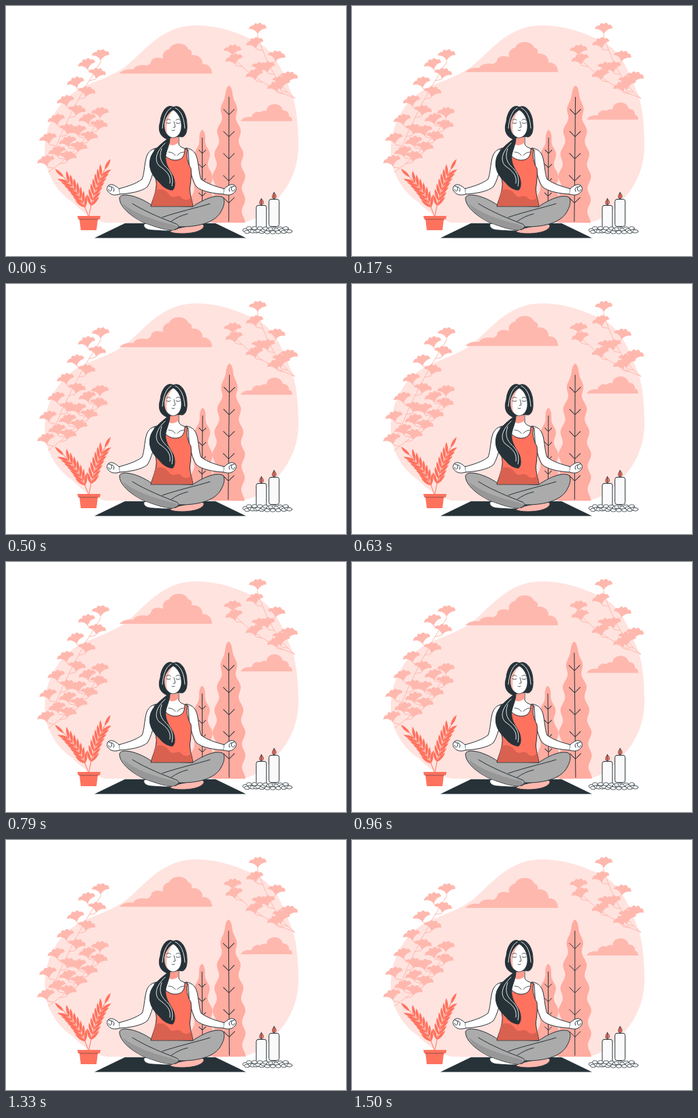
These frames come from a looping animation (500 by 368 pixels, 1.54 s). An HTML page:

```html
<!DOCTYPE html>
<html lang="en">
<head>
<meta charset="utf-8">
<title>Meditation</title>
<style>
  html, body { margin: 0; width: 100%; height: 100%; overflow: hidden; background: #fff; }
  svg { display: block; width: 500px; height: 368px; }
  .ink { fill: none; stroke: #263238; stroke-linecap: round; stroke-linejoin: round; }
  .flat { stroke: none; }
  .skin { fill: #fff; }
  .wax { fill: #fafafa; }
  .soft { fill: #ffb8ae; }
  .tree { fill: #ffaca1; }
  .coral { fill: #ff725e; }
  .dark { fill: #263238; }
  .twig { fill: none; stroke: #ffb8ae; }
  .stem { fill: none; stroke: #ff725e; }
  .shine { stroke: #fff; }
</style>
</head>
<body>
<svg viewBox="0 0 500 368">
  <path fill="#ffe3df" d="M147 319C128 315 111 303 97 288C78 276 57 249 57 213C57 180 72 148 97 129C120 112 148 109 176 89C200 70 222 38 262 30C300 23 350 40 379 59C402 77 411 108 421 131C428 152 430 180 430 208C429 250 408 275 395 289C380 304 365 319 340 319Z"/>

  <g id="clouds" class="soft">
    <path d="M167 100C171 95 177 93 187 94C191 87 200 87 208 88C212 86 214 83 214 80C219 75 226 76 231 78C229 69 235 65 240 64C244 53 264 53 268 64C273 65 274 69 273 73C281 71 290 77 289 86C296 85 303 90 303 100Z"/>
    <path d="M345 170C348 165 353 163 361 164C363 157 369 155 374 157C377 154 381 154 383 155C384 142 404 141 407 154C413 154 417 158 416 163C419 163 421 166 421 170Z"/>
  </g>

  <g id="ginkgo" class="soft"></g>
  <g id="potted" class="coral"></g>
  <path class="coral" d="M105 309H139L138 314H135L133 330H110L108 314H106Z"/>
  <path class="ink" stroke-width=".5" d="M108 314H135"/>
  <g id="trees"></g>
  <path class="dark" d="M175 319.7H308L353 341.5H130Z"/>

  <g class="ink" stroke-width="1">
    <!-- feet -->
    <path class="skin" d="M203 321C201 326 207 330 216 330C230 331 242 332 252 329L258 322L222 315Z"/>
    <path class="soft" d="M240 332C252 326 265 325 276 322C284 319 292 320 291 325C287 333 270 335 258 335C250 335 244 334 240 332Z"/>
    <!-- legs -->
    <path fill="#ababab" d="M214 293C194 279 170 274 167 282C166 294 182 309 203 319C220 325 238 332 250 329C257 326 251 324 257 325C285 325 309 318 317 301C321 294 323 284 318 281C307 277 288 286 275 295Z"/>
    <path class="flat" fill="#979797" d="M172 291C177 303 190 314 206 320C225 326 240 332 250 329C256 326 250 323 242 321C218 315 190 306 172 291Z"/>
    <path d="M186 291C207 304 233 314 251 321C256 324 253 328 248 329M230 311C253 303 281 297 300 291M243 317C250 312 258 308 267 306"/>
    <!-- arms -->
    <path class="skin" d="M222 209C211 211 207 217 205 229C203 240 203 248 200 255C191 262 177 266 166 269L167 277C183 276 200 273 208 266C213 258 215 249 218 239Z"/>
    <path class="skin" d="M265 209C276 211 280 217 282 229C284 240 284 248 287 255C296 262 310 266 321 269L320 277C304 276 288 273 280 266C275 259 273 249 270 239Z"/>
    <g id="hand">
      <path class="skin" d="M166 269C161 264 155 261 151 264C148 266 148 271 150 273C153 277 158 280 167 277"/>
      <path d="M151 265C154 265 157 268 155 271C153 274 151 272 151 270M155 266C159 267 160 270 158 273"/>
    </g>
    <use href="#hand" transform="matrix(-1 0 0 1 487 0)"/>
    <!-- torso -->
    <path class="skin" d="M238 188V204C233 208 225 209 218 211L221 246H270L268 212C262 209 255 208 254 203V188Z"/>
    <path class="flat" fill="#ff9c8f" d="M238.500 190H253.500V201C248 206 241 206 238.500 202Z"/>
    <path class="coral" d="M222 210C223 224 221 232 217 238C218 249 222 258 221 265C220 277 215 286 213 295H275C273 283 269 274 271 264C272 255 273 247 272 239C267 231 265 221 267 211L263 210C263 223 257 227 248 227C238 226 230 219 229 209Z"/>
    <path class="flat" fill="#d9614f" d="M220 271C218 280 215 287 214 294.500H274.500L272 282C266 288 260 285 257 281C251 277 247 284 241 279C235 270 228 268 220 271Z"/>
    <path stroke-width=".8" d="M239 215C244 215 247 217 249 220M252 220C254 217 258 215 262 215"/>
    <!-- hair and face -->
    <path class="dark" d="M246 149C236 143 228 157 227 170C223 182 226 192 237 196C228 203 214 214 212 226C209 240 216 251 226 260C231 267 239 271 245 271C249 267 249 259 246 251C240 240 233 232 235 219C237 210 241 203 241 194L255 192C264 196 267 184 266 174C266 160 257 143 246 149Z"/>
    <path class="skin" stroke-width=".7" d="M246 153C240 157 234 164 233 174C233 185 238 193 245 194C253 194 258 186 258 177C258 166 253 157 246 153Z"/>
    <path class="soft flat" d="M246 153C240 157 234 164 233 174C233 182 235 187 238 190C235 180 235 166 246 153Z"/>
    <path stroke-width=".8" d="M236 168Q239 165 242 168M250 168Q253 165 256 168M236 172Q239 174 242 172M250 172Q253 174 256 172M247 170L249 178L246 179M244 183Q246 184 248 183"/>
    <path class="shine" stroke-width=".9" d="M243 150C235 154 231 167 230 180M249 150C258 154 262 166 263 180M234 202C222 213 217 226 225 235C236 243 243 249 241 261M229 210C223 226 231 233 238 240C245 248 246 257 244 265"/>
  </g>

  <g id="candles" class="ink" stroke-width="1"></g>
</svg>
<script>
const $ = id => document.getElementById(id);
const repeat = (n, make) => Array.from({ length: n }, (_, i) => make(i)).join("");

// Point and heading on a quadratic curve
function along([a, b, c], k) {
  const m = 1 - k, axis = [0, 1];
  const [x, y] = axis.map(j => m * m * a[j] + 2 * m * k * b[j] + k * k * c[j]);
  const [dx, dy] = axis.map(j => m * (b[j] - a[j]) + k * (c[j] - b[j]));
  return { x, y, heading: Math.atan2(dy, dx) * 180 / Math.PI };
}
const curve = ([a, b, c]) => `M${a}Q${b} ${c}`;

// Branch with fan leaves on alternating sides and one at the tip
const fan = "M0 0C-1-5-7-9-13-8C-12-12-9-14-6-13C-5-17-2-18 0-15C3-19 6-17 7-14C10-16 13-13 13-9C7-9 2-5 0 0Z";
function branch(n, ...points) {
  return `<path class="twig" d="${curve(points)}"/>` + repeat(n, i => {
    const { x, y } = along(points, (i + 1) / n);
    const side = i === n - 1 ? 0 : i % 2 ? 1 : -1;
    return `<path class="twig" d="M${x} ${y}l${10 * side}-2"/>` +
      `<path d="${fan}" transform="translate(${x + 10 * side} ${y - 2}) rotate(${12 * side})"/>`;
  });
}
$("ginkgo").innerHTML =
  branch(10, [68, 220], [95, 150], [139, 83]) + branch(10, [62, 245], [105, 215], [138, 168]) +
  branch(6, [425, 136], [392, 112], [370, 44]) + branch(6, [425, 136], [375, 118], [333, 76]);

// Stem with pairs of narrow leaves and one at the tip
function sprig(pairs, ...points) {
  const leaf = ({ x, y, heading }, turn) =>
    `<path d="M0 0C6-3 12-3 18 0C12 2 6 3 0 0Z" transform="translate(${x} ${y}) rotate(${heading + turn})"/>`;
  return `<path class="stem" d="${curve(points)}"/>` + leaf(along(points, 1), 0) + repeat(pairs, i => {
    const spot = along(points, .2 + .75 * i / pairs);
    return leaf(spot, -30) + leaf(spot, 30);
  });
}
$("potted").innerHTML = sprig(7, [121, 309], [111, 277], [85, 252]) + sprig(7, [122, 309], [128, 271], [145, 241]);

// Wavy tree with a trunk and evenly spaced V-shaped twigs
function tree({ x, top, half, trunk, twigs, gap, reach }) {
  const ground = 319, left = [], right = [];
  for (let y = top; y <= ground; y += 2) {
    const grow = Math.min(1, (y - top) / (half * 6));
    const w = half * grow ** .55 + 2.5 * Math.min(1, grow * 3) * Math.cos((y - ground) * Math.PI / 17);
    left.unshift([x - w, y]);
    right.push([x + w, y]);
  }
  const lines = repeat(twigs, i => `M${x - reach} ${trunk + 18 + gap * i}l${reach} ${reach}l${reach}-${reach}`);
  return `<g><path class="tree" d="M${right.concat(left).join("L")}Z"/>` +
    `<path class="ink" d="M${x} ${trunk}V${ground - 2}${lines}"/></g>`;
}
$("trees").innerHTML =
  tree({ x: 288.6, top: 182, half: 14, trunk: 194, twigs: 4, gap: 21, reach: 5 }) +
  tree({ x: 327.8, top: 117, half: 21.5, trunk: 134, twigs: 5, gap: 32.5, reach: 8 });

const candle = (x, top) =>
  `<rect class="wax" x="${x}" y="${top}" width="15" height="40" rx="3"/>` +
  `<path class="coral" stroke-width=".7" d="M${x + 7.5} ${top - 10}c5 5 3 9 0 9c-4 0-3-5 0-9Zv10"/>`;
const stone = i =>
  `<ellipse class="skin" stroke-width=".8" cx="${352 + 2.7 * i}" cy="${330 + 3 * Math.sin(i * 2.2)}" rx="4" ry="2.4"/>`;
$("candles").innerHTML = candle(368, 293.5) + candle(386.7, 284.5) + repeat(25, stone);

const [small, tall] = $("trees").children;
const triangle = p => 1 - Math.abs(2 * p - 1);

function draw(now) {
  const p = Math.min(1, (now % 1540 + 30) / 1500);
  const sway = p < .25 ? 4 * p : p < .75 ? 2 - 4 * p : 4 * p - 4;
  $("clouds").setAttribute("transform", `translate(0 ${-10 * triangle(p)})`);
  small.setAttribute("transform", `rotate(${sway} 289 250)`);
  tall.setAttribute("transform", `rotate(${sway} 328 218)`);
  requestAnimationFrame(draw);
}
requestAnimationFrame(draw);
</script>
</body>
</html>
```
